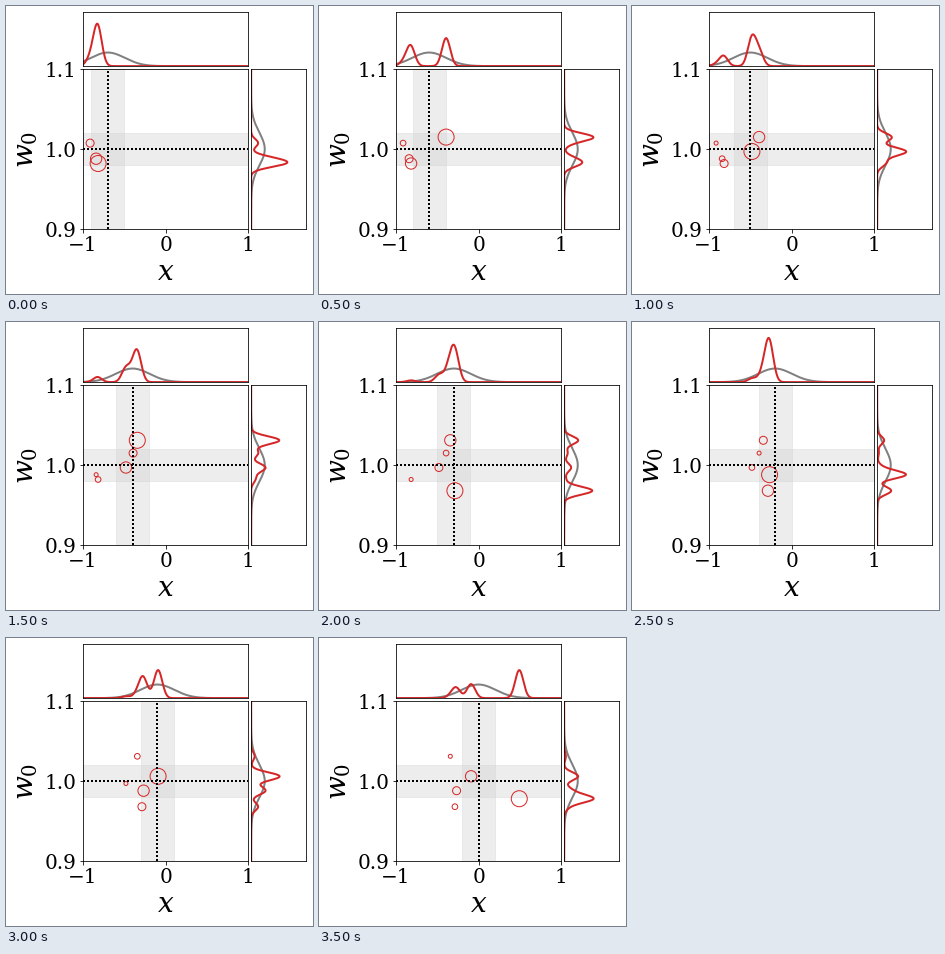
A matplotlib script that plays this animation: 307 px wide and 288 px high, repeating every 6000 ms.

```python
import numpy as np
import matplotlib.pyplot as plt
from matplotlib.animation import FuncAnimation

WIDTH, HEIGHT, DPI = 307, 288, 72
STEPS, FRAMES, INTERVAL = 8, 12, 500
MEMORY = 5
RED, GRAY = "tab:red", "gray"
X_SPREAD, W_SPREAD = 0.2, 0.02
X_KERNEL, W_KERNEL = 0.05, 0.005

plt.rcParams.update({
    "font.family": "DejaVu Serif",
    "mathtext.fontset": "dejavuserif",
    "font.size": 20,
})

# Samples (x, w0) in order of arrival; three are known at the start.
samples = np.array([
    (-0.915, 1.0075), (-0.842, 0.988), (-0.818, 0.982), (-0.394, 1.015),
    (-0.481, 0.997), (-0.343, 1.031), (-0.287, 0.968), (-0.267, 0.988),
    (-0.091, 1.006), (0.493, 0.978),
])


def gaussian(grid, mean, sigma):
    return np.exp(-0.5 * ((grid - mean) / sigma) ** 2) / (sigma * np.sqrt(2 * np.pi))


def mixture(grid, means, weights, sigma):
    return sum(w * gaussian(grid, m, sigma) for m, w in zip(means, weights))


fig = plt.figure(figsize=(WIDTH / DPI, HEIGHT / DPI), dpi=DPI, facecolor="white")


def add_axes(left, top, right, bottom):
    return fig.add_axes([left / WIDTH, 1 - bottom / HEIGHT,
                         (right - left) / WIDTH, (bottom - top) / HEIGHT])


main = add_axes(77.1, 63.1, 242.1, 223.1)
top = add_axes(77.1, 6.1, 242.1, 60.1)
side = add_axes(245.1, 63.1, 300.1, 223.1)

x_grid = np.linspace(-1, 1, 400)
w_grid = np.linspace(0.9, 1.1, 400)
band = dict(color="lightgray", alpha=0.4)
dotted = dict(color="black", ls=(0, (1, 1)), lw=2)


def draw(frame):
    step = min(frame, STEPS - 1)
    center = -0.7 + 0.1 * step
    recent = samples[:step + 3][::-1][:MEMORY]
    weights = 0.5 ** np.arange(1, len(recent) + 1)
    xs, ws = recent.T

    for ax in (main, top, side):
        ax.clear()

    main.axvspan(center - X_SPREAD, center + X_SPREAD, **band)
    main.axhspan(1 - W_SPREAD, 1 + W_SPREAD, **band)
    main.axvline(center, **dotted)
    main.axhline(1, **dotted)
    main.scatter(xs, ws, s=512 * weights, facecolors="none", edgecolors=RED, lw=1)
    main.set(xlim=(-1, 1), ylim=(0.9, 1.1),
             xticks=[-1, 0, 1], yticks=[0.9, 1.0, 1.1])
    main.set_xlabel("$x$", fontsize=28)
    main.set_ylabel("$w_0$", fontsize=28)

    top.plot(x_grid, gaussian(x_grid, center, np.hypot(X_SPREAD, X_KERNEL)),
             color=GRAY, lw=2)
    top.plot(x_grid, mixture(x_grid, xs, weights, X_KERNEL), color=RED, lw=2)
    top.set(xlim=(-1, 1), ylim=(0, 7.7), xticks=[], yticks=[])

    side.plot(gaussian(w_grid, 1, np.hypot(W_SPREAD, W_KERNEL)), w_grid,
              color=GRAY, lw=2)
    side.plot(mixture(w_grid, ws, weights, W_KERNEL), w_grid, color=RED, lw=2)
    side.set(xlim=(0, 78), ylim=(0.9, 1.1), xticks=[], yticks=[])


animation = FuncAnimation(fig, draw, frames=FRAMES, interval=INTERVAL,
                          init_func=lambda: None, repeat=True, repeat_delay=0)
plt.show()
```
